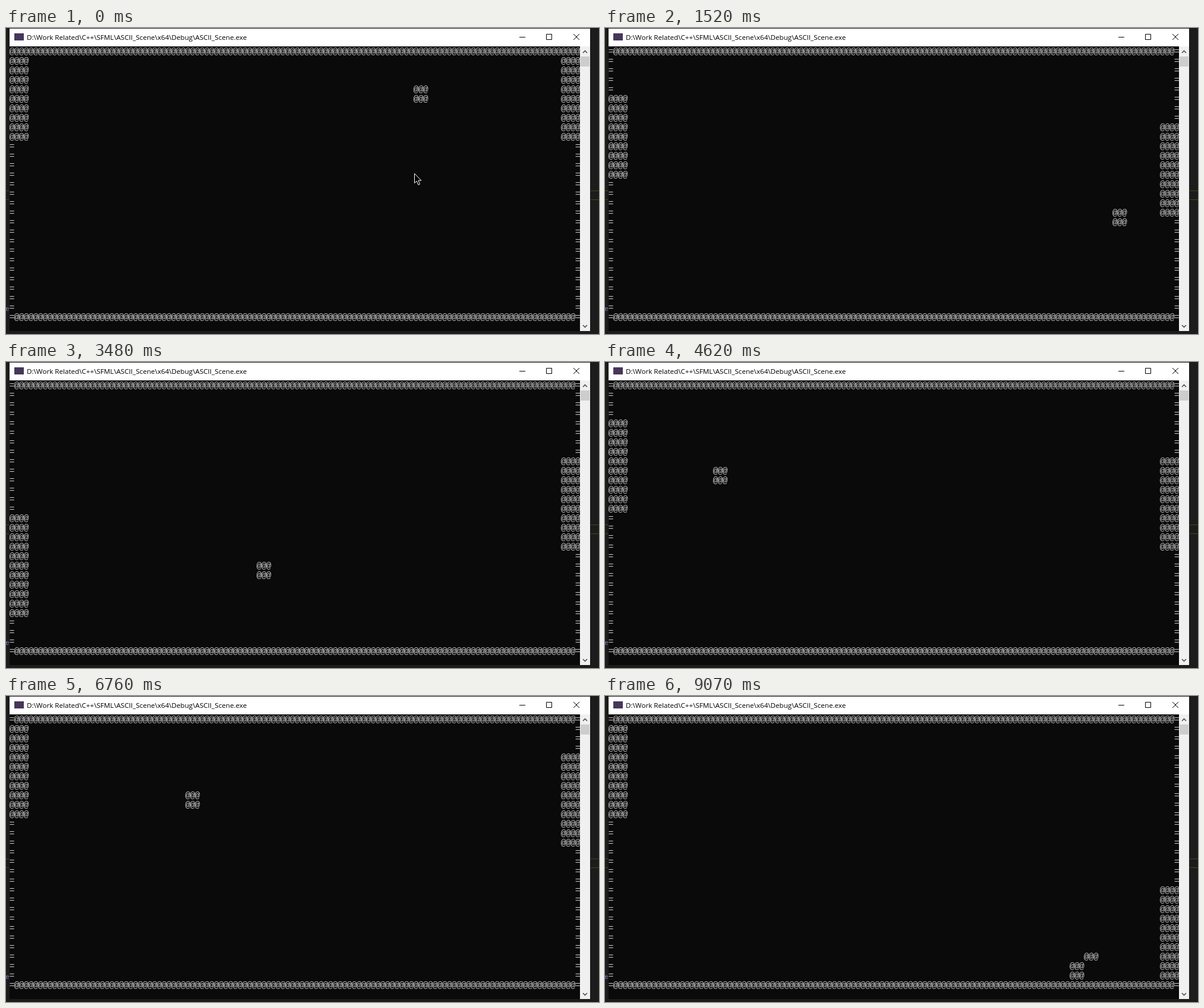
These frames come from a looping animation (998x516 px, 9.11 s). An HTML page:

```html
<!DOCTYPE html>
<html lang="en">
<head>
<meta charset="utf-8">
<title>ASCII scene</title>
<style>
  html, body { margin: 0; width: 100%; height: 100%; overflow: hidden; background: #1c1c1c; }
  svg { display: block; }
  .title { font: 11.65px "Open Sans", "Noto Sans", sans-serif; fill: #000; }
  .console text {
    font: 15px "Liberation Mono", "Noto Sans Mono", monospace;
    letter-spacing: -1px; fill: #ccc; white-space: pre;
  }
  .line { fill: none; stroke: #000; }
  .chevron { fill: none; stroke: #505050; stroke-width: 1.6; }
</style>
</head>
<body>
<svg width="998" height="516" viewBox="0 0 998 516">
  <rect width="998" height="516" fill="#1c1c1c"/>
  <path d="M0 274.5H5M0 289.5H5M984 274.5H998M984 289.5H998" stroke="#48481c"/>
  <text x="-1" y="477" font-size="11" font-family="Liberation Mono, monospace" fill="#8080b8">e</text>

  <rect x="6" y="1" width="977" height="31" fill="#fff"/>
  <rect x="14" y="9" width="16" height="12" fill="#46365a"/>
  <text class="title" x="35" y="20">D:\Work Related\C++\SFML\ASCII_Scene\x64\Debug\ASCII_Scene.exe</text>
  <path class="line" d="M864 15.5H874M909.5 10.5H918.5V19.5H909.5ZM955 10L965 20M965 10L955 20"/>

  <rect x="6" y="31" width="960" height="480" fill="#0a0a0a"/>
  <rect x="966" y="31" width="17" height="480" fill="#f0f0f0"/>
  <rect x="967" y="48" width="15" height="17" fill="#cdcdcd"/>
  <path class="chevron" d="M971 42L974.5 38.5L978 42M971 501L974.5 504.5L978 501"/>

  <g class="console" id="console"></g>
  <rect id="caret" x="430" y="139" width="8" height="4" fill="#f2f2f2"/>
  <path id="pointer" transform="translate(687.5 245.5)" fill="#000" stroke="#fff"
        d="M0 0V16L3.7 12.6L6.4 19L9 17.9L6.3 11.7H11.4Z"/>
</svg>
<script>
const LOOP = 9110, STEP = 111.55, PHASE = 0.596;
const ROWS = 29, COLS = 120, CELL_H = 16, LEFT = 6, TOP = 32;
const PADDLE_W = 4, PADDLE_H = 10;

const screen = document.getElementById("console");
const caret = document.getElementById("caret");
const pointer = document.getElementById("pointer");
const lines = Array.from({ length: ROWS }, (_, row) => {
  const line = document.createElementNS("http://www.w3.org/2000/svg", "text");
  line.setAttribute("x", LEFT - 0.5);
  line.setAttribute("y", TOP + row * CELL_H + 12);
  return screen.appendChild(line);
});

const clamp = (v, lo, hi) => Math.min(hi, Math.max(lo, v));

// Triangle wave: `half` at n = 0, falling to 0 at n = half
const bounce = (n, half) => {
  const period = 2 * half;
  return Math.abs(((n % period) + period) % period - half);
};

// Game state after a whole number of moves; paddles travel one row per move
function stateAt(step) {
  return {
    ballCol: 1 + 3 * bounce(step - 10, 38),
    ballRow: -1 + bounce(step - 23, 28),
    leftTop: clamp(step - 9, 0, 18) - clamp(step - 27, 0, 17),
    rightTop: clamp(step - 1, 0, 8) - clamp(step - 46, 0, 4) + clamp(step - 61, 0, 14)
  };
}

const within = (v, start, size) => v >= start && v < start + size;

function glyph(s, row, col) {
  const edge = col === 0 || col === COLS - 1;
  if (within(col, s.ballCol, 3) && within(row, s.ballRow, 2)) return "@";
  if (col < PADDLE_W && within(row, s.leftTop, PADDLE_H)) return "@";
  if (col >= COLS - PADDLE_W && within(row, s.rightTop, PADDLE_H)) return "@";
  if (edge) return "=";
  return row === 0 || row === ROWS - 1 ? "@" : "\u00a0";
}

function render(t) {
  const clock = t / STEP + PHASE;
  const step = Math.floor(clock);
  const current = stateAt(step), previous = stateAt(step - 1);

  // The console repaints cell by cell, so the rest still shows the previous move
  const painted = Math.floor((clock - step) * ROWS * COLS);
  lines.forEach((line, row) => {
    let text = "";
    for (let col = 0; col < COLS; col++) {
      text += glyph(row * COLS + col < painted ? current : previous, row, col);
    }
    if (line.textContent !== text) line.textContent = text;
  });

  caret.style.display = t >= 2160 && t < 2210 ? "" : "none";
  pointer.style.display = t < 200 ? "" : "none";
}

const start = performance.now();
function frame() {
  render((performance.now() - start) % LOOP);
  requestAnimationFrame(frame);
}
frame();
</script>
</body>
</html>
```
